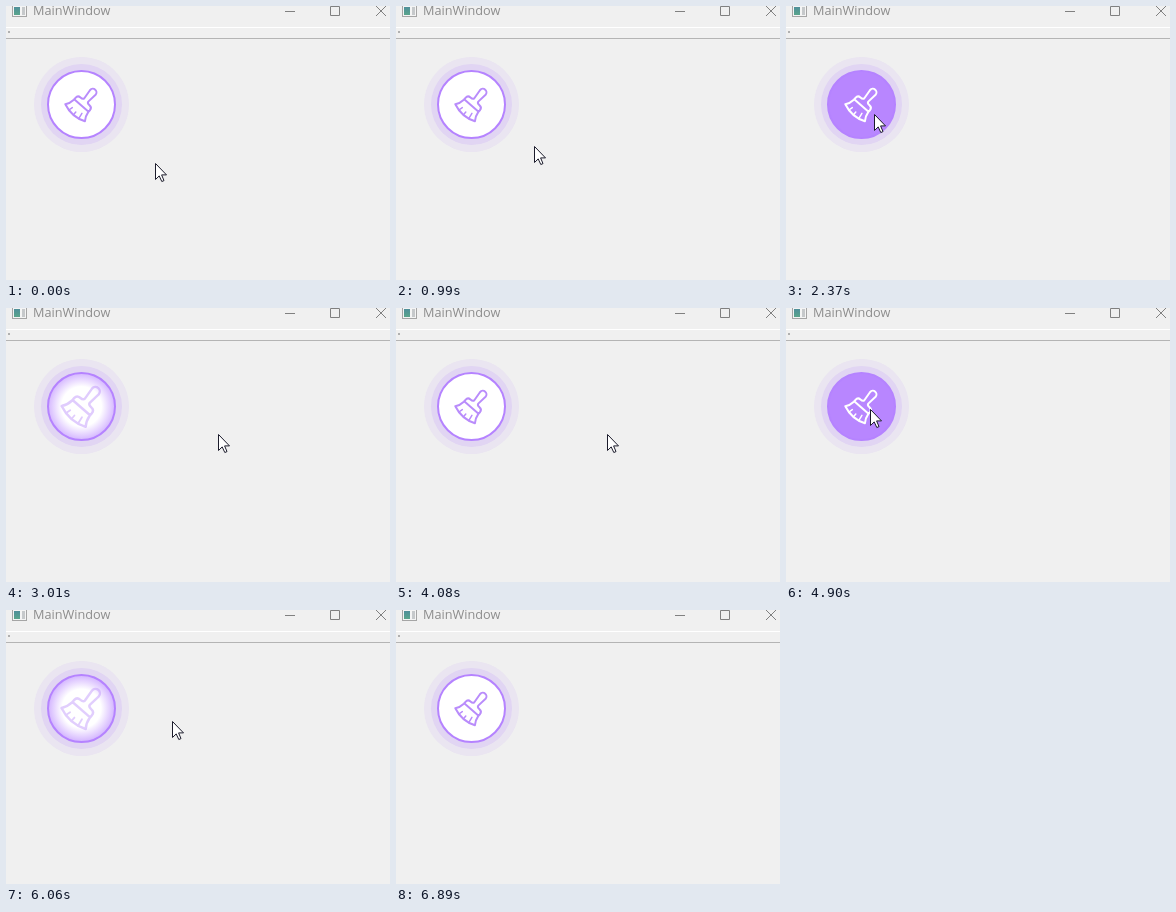
Recreate the animation shown at these times as an HTML page. Size 384x274 px, loop 7640 ms.

```html
<!DOCTYPE html>
<html lang="en">
<head>
<meta charset="utf-8">
<title>Hover button</title>
<style>
  html, body { margin: 0; width: 100%; height: 100%; overflow: hidden; background: #f0f0f0; }
  svg { display: block; width: 384px; height: 274px; }
  .title { font: 12.7px "Open Sans", "Noto Sans", sans-serif; fill: #8c8c8c; }
  .broom { fill: none; stroke-width: 2; stroke-linecap: round; stroke-linejoin: round; }
</style>
</head>
<body>
<svg viewBox="0 0 384 274">
  <defs>
    <radialGradient id="glow">
      <stop id="inner" stop-color="#b886ff"/>
      <stop id="outer" offset="1" stop-color="#b886ff"/>
    </radialGradient>
    <linearGradient id="pane" x2="0" y2="1">
      <stop stop-color="#4f8f9a"/>
      <stop offset="1" stop-color="#5aa58c"/>
    </linearGradient>
    <g id="broom">
      <path d="M-2.6-7L-3.6-17a3.6 3.6 0 0 1 7.2 0L2.6-7Q2.8-5 6-5Q9.5-5 9.5-1.5V1Q10 6 13 10Q0 15.5-13 10Q-10 6-9.5 1V-1.5Q-9.5-5-6-5Q-2.8-5-2.6-7ZM-9.5.5H9.5"/>
      <path d="M-6.5 12L-5.5 8M0 12.5V9M6.5 12L5.5 6" stroke-width="1.5"/>
    </g>
  </defs>

  <!-- window frame -->
  <rect width="384" height="274" fill="#f0f0f0"/>
  <rect x="6.5" y="-1.5" width="14" height="12" fill="#f4f4f4" stroke="#a5a5a5"/>
  <rect x="8" y="1" width="6" height="8" fill="url(#pane)"/>
  <rect x="16" y="1" width="3" height="8" fill="#c6c9cb"/>
  <text class="title" x="27" y="9">MainWindow</text>
  <path d="M279 5.5H289M324.5.5H333.5V9.5H324.5ZM370 0L380 10M380 0L370 10" fill="none" stroke="#808080"/>
  <path d="M0 21.5H384" stroke="#fff"/>
  <path d="M0 32.5H384" stroke="#b4b4b4"/>
  <rect x="2" y="25" width="2" height="2" fill="#b0b0b0"/>

  <!-- round button -->
  <g transform="translate(75.5 98.5)">
    <circle r="47.5" fill="#eae5f1"/>
    <circle r="40.5" fill="#e1d5f3"/>
    <circle r="33.5" fill="#fff"/>
    <circle r="33.5" fill="url(#glow)"/>
    <circle r="33.5" fill="none" stroke="#b583ff" stroke-width="2"/>
  </g>
  <g id="dust" fill="#fff">
    <circle cx="55.5" cy="112" r="6.5" opacity=".19"/>
    <circle cx="63" cy="114" r="2" opacity=".6"/>
  </g>
  <g id="sweeper" class="broom">
    <use id="violet" href="#broom" stroke="#b98cfb"/>
    <use id="white" href="#broom" stroke="#fff"/>
  </g>

  <path id="cursor" d="M.5.5V16.5L4.2 12.9L6.8 18.5L9 17.6L6.6 11.9H11.5Z" fill="#fff" stroke="#1c1c2c"/>
</svg>
<script>
const LOOP = 7640, TICK = 125, TICK_LEAD = 40;
const HOVERS = [{ enter: 1120, leave: 2600 }, { enter: 4440, leave: 5610 }];
const FILL = 110, SWEEP = 430, RELEASE = 640;
const POINTER_GONE = 6875;

// Turning points of the pointer: time, x, y.
const ROUTE = [
  [750, 149, 157], [1000, 138, 140], [1250, 89, 109], [2500, 88, 108],
  [2875, 212, 126], [4125, 211, 126], [4500, 84, 101], [5375, 84, 101],
  [6000, 166, 111], [6250, 168, 112], [6500, 185, 127], [6750, 267, 231]
];

const set = (id, attrs) => {
  const node = document.getElementById(id);
  for (const name in attrs) node.setAttribute(name, attrs[name]);
};
const clamp = v => Math.min(1, Math.max(0, v));

function pointerAt(time) {
  const next = ROUTE.findIndex(point => point[0] > time);
  if (next === 0) return ROUTE[0].slice(1);
  if (next < 0) return ROUTE.at(-1).slice(1);
  const [t0, ...from] = ROUTE[next - 1];
  const [t1, ...to] = ROUTE[next];
  const part = (time - t0) / (t1 - t0);
  return from.map((v, i) => Math.round(v + (to[i] - v) * part));
}

function buttonAt(time) {
  const rest = { fill: 0, white: 0, violet: 1, scale: 1, swing: 0 };
  const hover = HOVERS.find(h => time >= h.enter && time < h.leave + RELEASE);
  if (!hover) return rest;
  if (time < hover.leave) {
    const age = time - hover.enter;
    const fill = clamp(age / FILL);
    const swing = Math.sin(Math.PI * clamp(age / SWEEP));
    return { ...rest, fill, white: fill, violet: 1 - fill, swing };
  }
  const done = (time - hover.leave) / RELEASE;
  return {
    ...rest,
    fill: 1 - done,
    white: clamp(1 - done / 0.4),
    violet: clamp(1.5 * done - 0.5),
    scale: 1 + Math.min(0.25, 0.6 * (1 - done))
  };
}

function draw(now) {
  // The picture advances in regular steps, like a screen recording.
  const time = Math.floor((now % LOOP + TICK_LEAD) / TICK) * TICK;
  const { fill, white, violet, scale, swing } = buttonAt(time);

  set("inner", { offset: 0.95 * (1 - fill), "stop-opacity": clamp(3 * fill - 2) });
  set("outer", { "stop-opacity": clamp(1.6 * fill) });
  set("white", { opacity: white });
  set("violet", { opacity: violet });
  set("sweeper", { transform: `translate(75.7 99.2) rotate(${41 - 80 * swing}) scale(${scale})` });
  set("dust", { opacity: clamp(3 * swing - 1.9) });
  set("cursor", {
    visibility: time < POINTER_GONE ? "visible" : "hidden",
    transform: `translate(${pointerAt(time)})`
  });
}

const start = performance.now();
function frame() {
  draw(performance.now() - start);
  requestAnimationFrame(frame);
}
frame();
</script>
</body>
</html>
```
